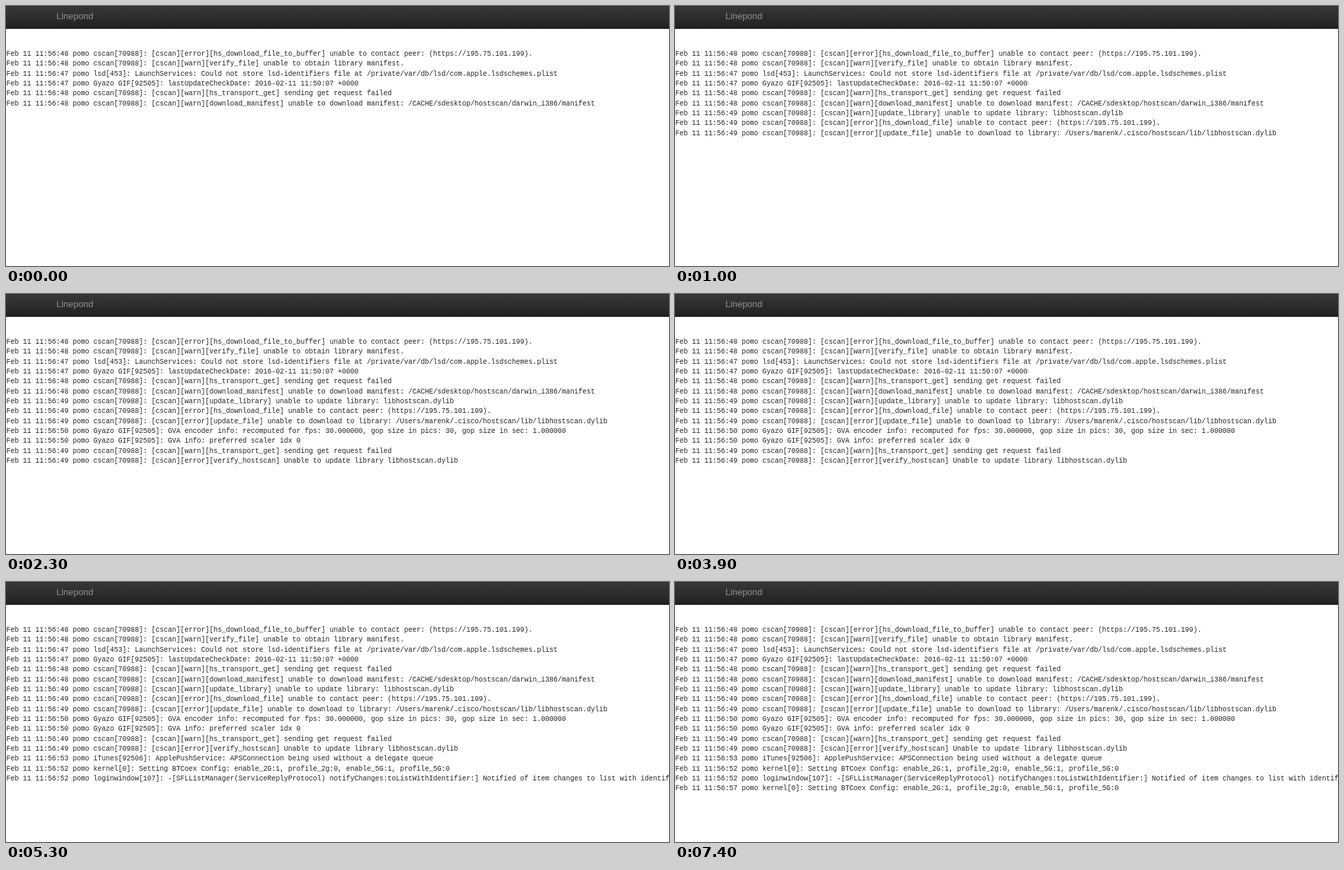
Recreate the animation shown at these times as an HTML page. Size 960 px wide and 376 px high, loop 7.5 s.

```html
<!DOCTYPE html>
<html lang="en">
<head>
<meta charset="utf-8">
<title>Linepond</title>
<style>
  html, body {
    margin: 0;
    width: 100%;
    height: 100%;
    overflow: hidden;
    background: #fff;
  }
  header {
    position: absolute;
    inset: 0 0 auto;
    height: 33px;
    box-sizing: border-box;
    border-bottom: 1px solid #141414;
    background: linear-gradient(#383838, #212121);
    color: #919191;
    font: 13px/29px "Liberation Sans", Arial, sans-serif;
    padding-left: 73px;
  }
  #log {
    position: absolute;
    inset: 63.4px 0 0;
    overflow: hidden;
    contain: strict;
    padding-left: 0.5px;
    white-space: pre;
    color: #222;
    font: 10px/14.33px "Liberation Mono", "Courier New", monospace;
  }
  #log div {
    height: 14.33px;
    overflow: hidden;
  }
</style>
</head>
<body>
<header>Linepond</header>
<div id="log"></div>
<script>
  const LOOP = 7500;
  const HOST = "pomo";
  const SCAN = "cscan[70988]: [cscan]";
  const GIF = "Gyazo GIF[92505]: ";
  const BTCOEX = "kernel[0]: Setting BTCoex Config: enable_2G:1, profile_2g:0, enable_5G:1, profile_5G:0";

  // [arrival in ms, seconds of the timestamp, message]
  const entries = [
    [0, 48, SCAN + "[error][hs_download_file_to_buffer] unable to contact peer: (https://195.75.101.199)."],
    [0, 48, SCAN + "[warn][verify_file] unable to obtain library manifest."],
    [0, 47, "lsd[453]: LaunchServices: Could not store lsd-identifiers file at /private/var/db/lsd/com.apple.lsdschemes.plist"],
    [0, 47, GIF + "lastUpdateCheckDate: 2016-02-11 11:50:07 +0000"],
    [0, 48, SCAN + "[warn][hs_transport_get] sending get request failed"],
    [0, 48, SCAN + "[warn][download_manifest] unable to download manifest: /CACHE/sdesktop/hostscan/darwin_i386/manifest"],
    [1000, 49, SCAN + "[warn][update_library] unable to update library: libhostscan.dylib"],
    [1000, 49, SCAN + "[error][hs_download_file] unable to contact peer: (https://195.75.101.199)."],
    [1000, 49, SCAN + "[error][update_file] unable to download to library: /Users/marenk/.cisco/hostscan/lib/libhostscan.dylib"],
    [1500, 50, GIF + "GVA encoder info: recomputed for fps: 30.000000, gop size in pics: 30, gop size in sec: 1.000000"],
    [1500, 50, GIF + "GVA info: preferred scaler idx 0"],
    [1500, 49, SCAN + "[warn][hs_transport_get] sending get request failed"],
    [1500, 49, SCAN + "[error][verify_hostscan] Unable to update library libhostscan.dylib"],
    [4100, 53, "iTunes[92506]: ApplePushService: APSConnection being used without a delegate queue"],
    [4200, 52, BTCOEX],
    [4200, 52, "loginwindow[107]: -[SFLListManager(ServiceReplyProtocol) notifyChanges:toListWithIdentifier:] Notified of item changes to list with identifier"],
    [7100, 57, BTCOEX]
  ];

  const log = document.getElementById("log");
  const lines = entries.map(([at, sec, message]) => {
    const el = document.createElement("div");
    el.textContent = `Feb 11 11:56:${sec} ${HOST} ${message}`;
    log.append(el);
    return { at, el };
  });

  const start = performance.now();

  function draw() {
    const t = (performance.now() - start) % LOOP;
    for (const { at, el } of lines) {
      el.style.visibility = t >= at ? "visible" : "hidden";
    }
    requestAnimationFrame(draw);
  }
  draw();
</script>
</body>
</html>
```
